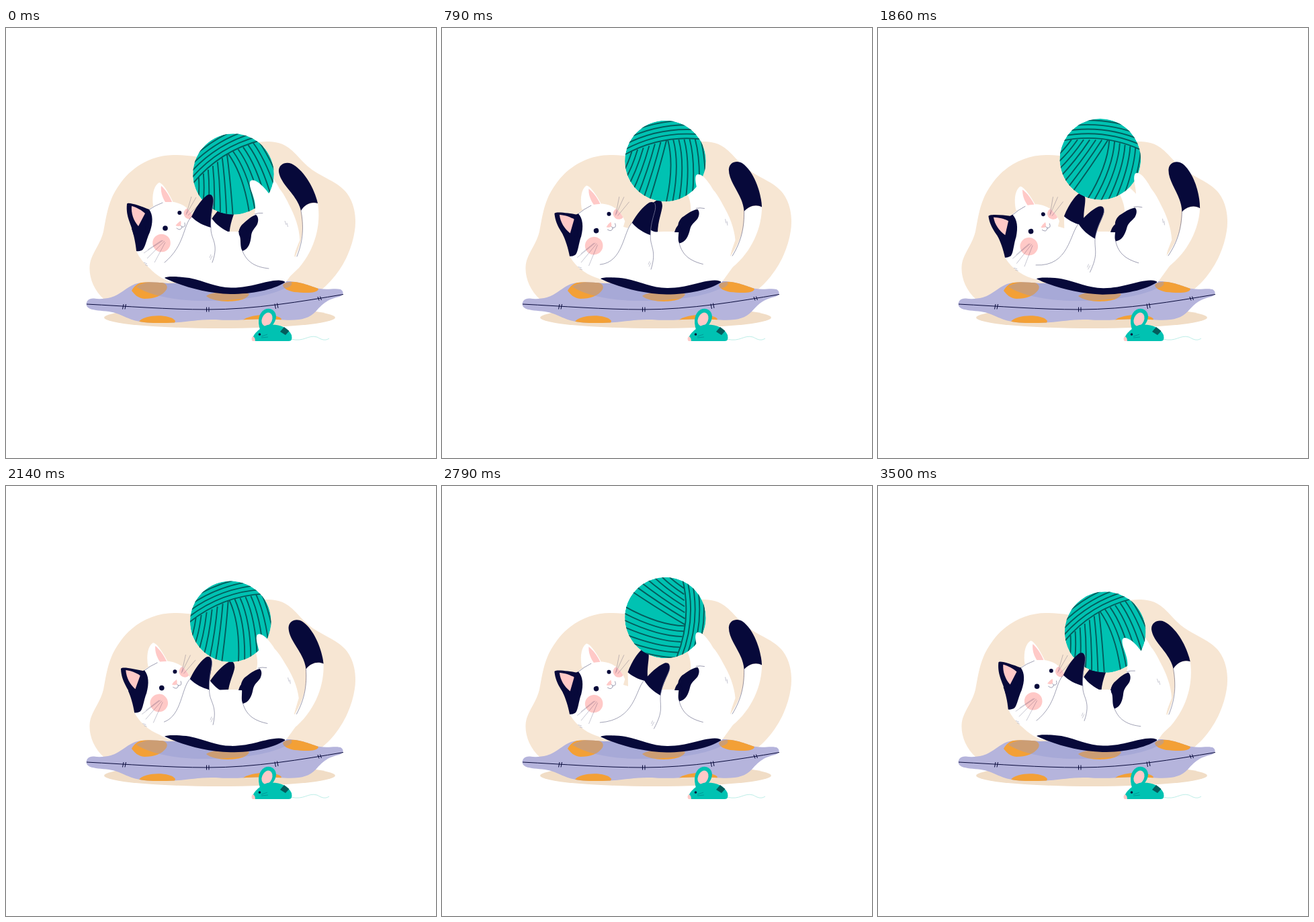
An HTML page that plays this animation: 640x640 px, repeating every 3570 ms.

```html
<!DOCTYPE html>
<html lang="en">
<head>
<meta charset="utf-8">
<title>Cat with a ball of yarn</title>
<style>
  html, body { margin: 0; width: 100%; height: 100%; overflow: hidden; background: #fff; }
  svg { display: block; width: 100vw; height: 100vh; }
  .navy { fill: #07093a; }
  .white { fill: #fff; }
  .pink { fill: #ffc9c7; }
  .teal { fill: #00c2b2; }
  .orange { fill: #f3a036; }
  .thin { fill: none; stroke: #0a0b3d; stroke-width: .7; stroke-opacity: .55; stroke-linecap: round; }
  .faint { fill: none; stroke: #0a0b3d; stroke-width: .5; stroke-opacity: .45; }
  .seam { fill: none; stroke: #07093a; stroke-width: 1; }
  .yarn { fill: none; stroke: #045c5c; stroke-width: 1.9; }
</style>
</head>
<body>
<svg viewBox="0 0 640 640">
  <defs>
    <clipPath id="round"><circle r="60.3"/></clipPath>
    <path id="pillow" d="M119.500 411C120 406 123 402 131 402.500C139 404 148 403 156 401C170 397 179 386 192 381C204 377 219 378 240 380L415 377C443 377 452 385 467 388C480 390 489 387 498 389C504 393 502 398 496 400C477 404 470 412 461 422C449 434 436 436 405 434C370 431 345 437 312 434C280 433 265 440 225 439C195 439 184 433 168 426C150 418 120 424 119.500 411Z"/>
    <clipPath id="onPillow"><use href="#pillow"/></clipPath>
    <path id="face" d="M211 271Q221 263 234 259L250 259C263 262 275 268 281 288L277 298L255 325L236 370C220 364 203 352 194 332Z"/>
    <clipPath id="onFace"><use href="#face"/></clipPath>
    <path id="leg" d="M347 308C354 291 371 289 371 268C371 250 361 239 363 229C365 224 372 227 377 231C384 237 388 242 391 246C398 252 404 260 409 267C420 281 430 298 434 316L428 345L400 362L360 350Z"/>
    <path id="paw" d="M276 281C282 268 290 256 299 249C304 246 308 248 309 256C309 266 304 278 305 297C294 294 284 289 276 281Z"/>
  </defs>

  <path fill="#f7e6d3" d="M146 404C128 388 121 364 126 346C131 331 141 320 145 303C150 277 152 255 171 230C190 204 220 189 250 189C276 189 288 194 310 192C340 189 355 168 392 169C421 170 430 188 445 202C464 221 490 226 505 243C519 259 522 283 519 302C514 335 495 374 458 398Z"/>
  <ellipse cx="318" cy="431" rx="172" ry="16" fill="#f1ddc6"/>

  <use href="#pillow" fill="#b5b4dc"/>
  <g clip-path="url(#onPillow)">
    <g class="orange">
      <path d="M187 391C193 379 205 376 222 377C236 378 242 382 239 389C233 399 220 403 206 403C196 402 192 397 187 391Z"/>
      <path d="M298 399C305 391 355 391 362 396C358 410 310 410 298 399Z"/>
      <path d="M412 383C414 372 464 380 465 389C462 396 442 394 429 393C420 391 413 388 412 383Z"/>
      <path d="M198 437C205 426 245 425 252 436L250 442H200Z"/>
      <path d="M352 435C366 425 402 424 410 433L408 438H354Z"/>
    </g>
    <path fill="#9198d0" fill-opacity=".4" d="M194 385C205 376 235 377 250 376L420 374C428 379 428 384 414 388C385 402 330 407 285 406C250 405 213 398 194 385Z"/>
  </g>
  <path class="seam" d="M120 411C180 414 240 419 300 419C370 419 440 407 502 396.500"/>
  <path class="seam" d="M175 411L173.500 418.500M178.500 411L177 418.500M298.500 415.500V422.500M302 415.500V422.500M400 410.500L401.500 418M403.500 409.500L405 417M464 400L466 405.500M467.500 399.500L469.500 405"/>

  <use id="farLeg" href="#leg" class="white"/>
  <path id="farArm" class="white"/>
  <use id="farPaw" href="#paw" class="navy"/>

  <g id="ball"><g clip-path="url(#round)">
    <circle r="60.3" class="teal"/>
    <path id="yarn" class="yarn"/>
  </g></g>

  <path class="white" d="M205 346C215 362 228 371 242 377L330 389L416 379L437 350L400 300L350 303L330 303L305 304L277 298L250 290Z"/>
  <g id="tail">
    <path class="white" d="M439 272C445 262 455 259 464 261C469 291 461 328 436 357L415 377L392 376L430 342C441 318 445 295 439 272Z"/>
    <path class="navy" d="M406 214C405 203 416 198 425 202C443 211 459 238 464 261C455 258 445 262 439 272C433 247 409 234 406 214Z"/>
    <path class="thin" d="M439 272C443 295 443 315 433 340"/>
  </g>
  <g id="nearLeg">
    <use href="#leg" class="white"/>
    <path class="navy" d="M372 278C376 281 376 287 374 292C370 299 366 301 365 309C364 320 361 329 352 332C348 327 350 316 348 310C345 305 347 298 351 293C358 287 363 281 372 278Z"/>
    <path class="thin" d="M370 277Q375 275 382 275.500M352 332C359 350 373 356 391 358"/>
    <path class="faint" d="M415 287L417 293M418 290L419.500 296"/>
  </g>
  <path class="navy" d="M346 304Q348 296 353 292L359 304Z"/>

  <g id="head">
    <g id="rightEar">
      <path class="white" d="M219 265C217 251 219 235 228 230C234 231 243 247 249 260Z"/>
      <path class="pink" d="M231 235C237 240 243 249 247 259H237C232 251 230 243 231 235Z"/>
    </g>
    <use href="#face" class="white"/>
    <circle cx="273" cy="276" r="8.500" class="pink" clip-path="url(#onFace)"/>
    <path class="navy" d="M210 271L213 270C219 278 219 290 214 304C209 314 207 329 202 331Q197 333 194 332C193 320 190 307 187 299L200 280Z"/>
    <g id="leftEar">
      <path class="navy" d="M180 262C181 258 200 265 213 270L207 300L190 308C187 292 178 282 180 262Z"/>
      <path class="pink" d="M187 265C194 267 202 271 207 276L197 295C190 287 186 276 187 265Z"/>
    </g>
    <circle cx="231.500" cy="320" r="13.300" class="pink"/>
    <circle cx="258.300" cy="275" r="3" class="navy"/>
    <circle cx="237" cy="298" r="3.800" class="navy"/>
    <path class="pink" d="M260 287Q255 290 252.500 294Q257 296 260 294Q261 290 260 287Z"/>
    <path class="thin" d="M212 271Q222 264 233 260M260 294L262 296M254 298Q260 303 262 296Q268 297 266 290"/>
    <path class="faint" d="M234 316L205 335M236 317L210 343M237 319L221 349M232 316L211 330M269 276L283 252M271 279L290 260M268 278L276 251M205 349L210 351M207 352L211 354"/>
  </g>

  <path id="nearArm" class="white"/>
  <path id="armLines" class="thin"/>
  <path id="fur" class="faint" d="M303 342L305 337M304 345L307 339"/>
  <g id="nearPaw">
    <use href="#paw" class="navy"/>
    <path fill="none" stroke="#9a9bb8" stroke-width=".6" d="M307 249Q310 254 308 263C306 274 304 282 305 297"/>
  </g>

  <path id="belly" class="navy" d="M236 372C240 369 257 370 273 372C297 377 312 386 335 386.500C365 387 384 376 406 375.500Q415 376 415.500 378.500C397 390 367 396 334 396C296 395 258 383 236 372Z"/>

  <path fill="none" stroke="#bdeee8" stroke-width="1" d="M424 463C444 468 449 456 463 460C470 464 475 466 481 462"/>
  <path class="teal" d="M378 449C374 436 376 424 385 419C394 415 402 421 402 430C401 438 397 443 391 447Z"/>
  <ellipse cx="388.500" cy="433.700" rx="7.500" ry="10.500" transform="rotate(24 388.500 433.700)" class="pink"/>
  <path class="teal" d="M367 466C365 457 378 446 389 442C406 440 420 446 425 457Q427 466 421 466Z"/>
  <path class="pink" d="M367 459Q371 460 371 466H367Q364 463 367 459Z"/>
  <path fill="#045c5c" d="M408 452L414 445L421.500 451L416 457Z"/>
  <circle cx="377.500" cy="456" r="1.800" class="navy"/>
  <path class="faint" d="M380 459L389 456M380 461L390 460"/>
</svg>
<script>
const LOOP = 3570, STEPS = 50, CYCLES = 3;
const $ = id => document.getElementById(id);
const put = (id, value, name = 'transform') => $(id).setAttribute(name, value);
const smooth = x => { x = Math.min(1, Math.max(0, x)); return x * x * (3 - 2 * x); };
const turn = (deg, x, y) => `rotate(${deg} ${x} ${y})`;

// Flat-ended Bezier easing: horizontal handles at x1 and x2.
function ease(x, x1, x2) {
  let lo = 0, hi = 1;
  for (let i = 0; i < 24; i++) {
    const s = (lo + hi) / 2, r = 1 - s;
    if (3 * r * r * s * x1 + 3 * r * s * s * x2 + s ** 3 < x) lo = s; else hi = s;
  }
  return smooth(lo);
}

function yarnPath() {
  let d = '';
  for (let i = 0; i < 5; i++) {
    const y = -7 * i;
    d += `M-62 ${-20 + y}Q0 ${-41 + y * .9} 62 ${-20 + y}`;
  }
  for (let i = 0; i < 7; i++) {
    const x = 10 + 8 * i;
    d += `M${x} ${-30 + i * 1.4}Q${x + 2} 10 ${x - 22 + i * 2} 62`;
  }
  for (let i = 0; i < 7; i++) {
    const x = 8 - 9 * i;
    d += `M${x} ${-30 + i}Q${x - 18} 8 ${x - 46 + i * 2} ${58 - i * 7}`;
  }
  return d;
}
put('yarn', yarnPath(), 'd');

// A paw's placement, with its two wrist corners for joining the arm.
function paw(dx, dy, deg) {
  const a = deg * Math.PI / 180, c = Math.cos(a), s = Math.sin(a);
  const at = (x, y) => [290.5 + dx + x * c - y * s, 289 + dy + x * s + y * c];
  return {
    move: `translate(${dx} ${dy}) ${turn(deg, 290.5, 289)}`,
    left: at(-14.5, -8),
    right: at(14.5, 8)
  };
}

function draw(p) {
  const b = smooth(p < .5 ? 2 * p : 2 - 2 * p);
  const a = smooth(p / .26) - smooth((p - .53) / .22);

  const lift = p < .5 ? ((.5 - p) / .5) ** 2.7 : Math.min(1, ((p - .5) / .44) ** 2);
  const spin = -33 - 360 * ease(p, .33, .07);
  put('ball', `translate(${338.5 - 8 * b} ${195 + 22.5 * lift}) rotate(${spin})`);

  put('tail', turn(12.8 * b, 438, 335));
  put('nearLeg', turn(10.2 * b, 438, 335));
  put('farLeg', turn(10 - 14 * b, 438, 335));
  put('head', `translate(${-11.4 * b} ${3.6 * b}) ${turn(-7.3 * b, 247.5, 286.5)}`);
  put('leftEar', turn(-8 * b, 226, 287));
  put('rightEar', turn(3 * b, 234, 260));
  put('belly', turn(-.5 * b, 415, 377));

  const far = paw(29 - 24.5 * a - 4.6 * b, 5 - 19 * a + 12 * b, 9 - 13 * a);
  put('farPaw', far.move);
  put('farArm', `M${far.left}L${far.right}L325 335L278 335Z`, 'd');

  const near = paw(26 * a - 4.6 * b, 2.3 * a + 12 * b, 14 * a);
  const [lx, ly] = near.left, [rx, ry] = near.right;
  const ex = 307 + 7 * a + 2 * b, ey = 349 + 12 * b + 3 * a;
  const inner = `C${lx - 13} ${ly + 13} ${lx - 9 - 5 * b} ${ly + 42 + 23 * b} ${236 - b} ${349 + 4 * b}`;
  const outer = `C${rx - 1} ${ry + 18} ${rx + 13 - 8 * a} ${ry + 22} ${ex} ${ey}`;
  put('nearPaw', near.move);
  put('nearArm', `M${lx} ${ly}L${rx} ${ry}${outer}L${236 - b} ${349 + 4 * b}Z`, 'd');
  put('armLines', `M${lx} ${ly}${inner}M${rx} ${ry}${outer}`, 'd');
  put('fur', `translate(${ex - 307} ${ey - 349})`);
}

function tick(now) {
  const step = Math.floor((now % LOOP) * STEPS / LOOP + .01) % STEPS;
  draw(step * CYCLES / STEPS % 1);
  requestAnimationFrame(() => tick(performance.now()));
}
tick(performance.now());
</script>
</body>
</html>
```
